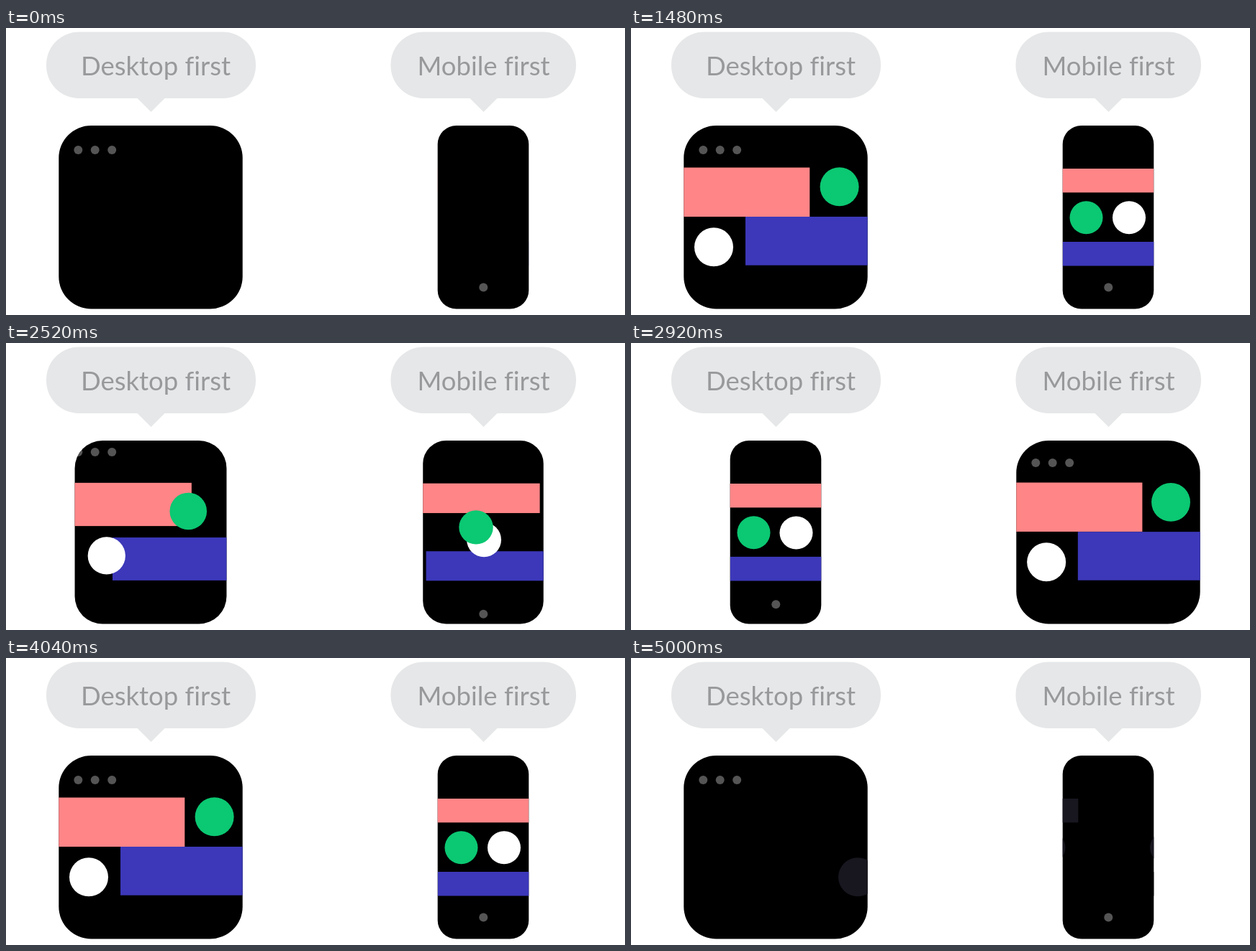
An HTML page for the animation above (5040 ms loop, 860 by 400 pixels).

```html
<!DOCTYPE html>
<html lang="en">
<head>
<meta charset="utf-8">
<title>Desktop first, mobile first</title>
<style>
  html, body { margin: 0; width: 100%; height: 100%; overflow: hidden; background: #fff; }
  svg { display: block; width: 860px; height: 400px; }
  text { font: 36.5px Lato, "Open Sans", sans-serif; font-variant-ligatures: none; fill: #98999b; text-anchor: middle; }
</style>
</head>
<body>
<svg id="stage" viewBox="0 0 860 400"></svg>
<script>
const LOOP = 5040, STEP = 40;
const ENTER = 400, MORPH = 640, MORPH_OUT = 2180, MORPH_BACK = 3220, EXIT = 4600, EXIT_TIME = 440;
const TOP = 136, BOTTOM = 391.5;
const COLORS = { pink: [255, 133, 135], blue: [60, 56, 185], green: [11, 200, 114], white: [255, 255, 255] };
const DIM = [24, 22, 31], BLACK = [0, 0, 0];

const stage = document.getElementById('stage');
const clamp = x => Math.min(1, Math.max(0, x));
const lerp = (a, b, k) => a + (b - a) * k;
const span = (t, start, length) => clamp((t - start) / length);
const easeIn = x => x * x;
const easeOut = x => 1 - (1 - x) ** 2;
const easeBoth = x => x < 0.5 ? 2 * x * x : 1 - 2 * (1 - x) ** 2;

function set(node, attrs) {
  for (const key in attrs) node.setAttribute(key, attrs[key]);
}
function add(parent, tag, attrs = {}) {
  const node = document.createElementNS('http://www.w3.org/2000/svg', tag);
  set(node, attrs);
  return parent.appendChild(node);
}

// Each part: [delay of first morph, delay of morph back, slide-in start, slide distance]
const PANELS = [
  {
    id: 'desktop', label: 'Desktop first', textX: 208, center: 201, bubble: [56, 347], startsWide: true,
    parts: {
      frame: [74, 157],
      pink: [121, 73, 418, -242],
      blue: [123, 73, 897, 242],
      green: [90, 81, 177, 242],
      white: [130, 116, 657, 242]
    }
  },
  {
    id: 'mobile', label: 'Mobile first', textX: 663.5, center: 663, bubble: [534.5, 792], startsWide: false,
    parts: {
      frame: [85, 118],
      pink: [123, 60, 122, -127],
      blue: [127, 35, 1088, 127],
      green: [152, 106, 607, -63],
      white: [117, 62, 607, 63]
    }
  }
];

function build(panel) {
  const { id, center, bubble: [left, right] } = panel;
  add(stage, 'rect', { x: left, y: 5.5, width: right - left, height: 92.5, rx: 45.5, fill: '#e6e7e8' });
  add(stage, 'path', { d: `M${center - 19.5} 97h40l-20 20z`, fill: '#e6e7e8' });
  add(stage, 'text', { x: panel.textX, y: 66 }).textContent = panel.label;

  const clip = add(add(stage, 'defs'), 'clipPath', { id });
  panel.outline = add(clip, 'rect', { y: TOP, height: BOTTOM - TOP });
  const screen = add(stage, 'g', { 'clip-path': `url(#${id})` });
  add(screen, 'rect', { width: 860, height: 400 });
  panel.dots = [-100.7, -77.3, -53.8].map(dx => add(screen, 'circle', { cx: center + dx, r: 6, fill: '#555' }));
  panel.home = add(screen, 'circle', { cx: center + 0.3, r: 6, fill: '#555' });
  panel.pink = add(screen, 'rect');
  panel.blue = add(screen, 'rect');
  panel.white = add(screen, 'circle');
  panel.green = add(screen, 'circle');
}

// 1 is the wide desktop layout, 0 the narrow mobile one
function wideness(panel, name, t) {
  const [there, back] = panel.parts[name];
  const morph = easeBoth(span(t, MORPH_OUT + there, MORPH)) - easeBoth(span(t, MORPH_BACK + back, MORPH));
  return panel.startsWide ? 1 - morph : morph;
}

function slide(panel, name, t) {
  const [, , start, distance] = panel.parts[name];
  const hidden = 1 - easeOut(span(t, start, ENTER)) + easeIn(span(t, EXIT, EXIT_TIME));
  return distance * hidden;
}

function color(name, t) {
  const end = name === 'blue' ? BLACK : DIM;
  const fade = span(t, EXIT, 400);
  return `rgb(${COLORS[name].map((c, i) => Math.round(lerp(c, end[i], fade)))})`;
}

function drawBand(panel, name, side, half, narrow, wide, t) {
  const k = wideness(panel, name, t);
  const [edge, y, bottom] = narrow.map((v, i) => lerp(v, wide[i], k));
  const inner = panel.center + side * Math.min(edge, half) + slide(panel, name, t);
  const outer = inner - side * 300;
  set(panel[name], { x: Math.min(inner, outer), y, width: 300, height: bottom - y, fill: color(name, t) });
}

function drawBall(panel, name, narrow, wide, t) {
  const k = wideness(panel, name, t);
  const [dx, cy, r] = narrow.map((v, i) => lerp(v, wide[i], k));
  set(panel[name], { cx: panel.center + dx + slide(panel, name, t), cy, r, fill: color(name, t) });
}

// Dots and home button swap: one leaves before the other arrives
function drawControls(panel, t) {
  const first = easeIn(span(t, 2188, 500)) - easeOut(span(t, 3640, 410));
  const second = 1 - easeOut(span(t, 2680, 330)) + easeIn(span(t, 3210, 390));
  const [dots, home] = panel.startsWide ? [first, second] : [second, first];
  panel.dots.forEach(dot => set(dot, { cy: 170 - 41 * dots }));
  set(panel.home, { cy: 361.5 + 37 * home });
}

function draw(t) {
  for (const panel of PANELS) {
    const k = wideness(panel, 'frame', t);
    const half = lerp(63.3, 127.7, k);
    set(panel.outline, { x: panel.center - half, width: 2 * half, rx: lerp(26, 45, k) });
    drawControls(panel, t);
    drawBand(panel, 'pink', 1, half, [88, 196, 229.3], [47.3, 194.5, 263], t);
    drawBand(panel, 'blue', -1, half, [90, 298, 331.5], [42, 263, 330.7], t);
    drawBall(panel, 'white', [29, 264.3, 23], [-86, 305.3, 27], t);
    drawBall(panel, 'green', [-30.5, 264.3, 23], [88.6, 221.3, 27], t);
  }
}

PANELS.forEach(build);
const begin = performance.now();
function tick() {
  const t = (performance.now() - begin) % LOOP;
  draw(Math.floor(t / STEP) * STEP);
  requestAnimationFrame(tick);
}
tick();
</script>
</body>
</html>
```
